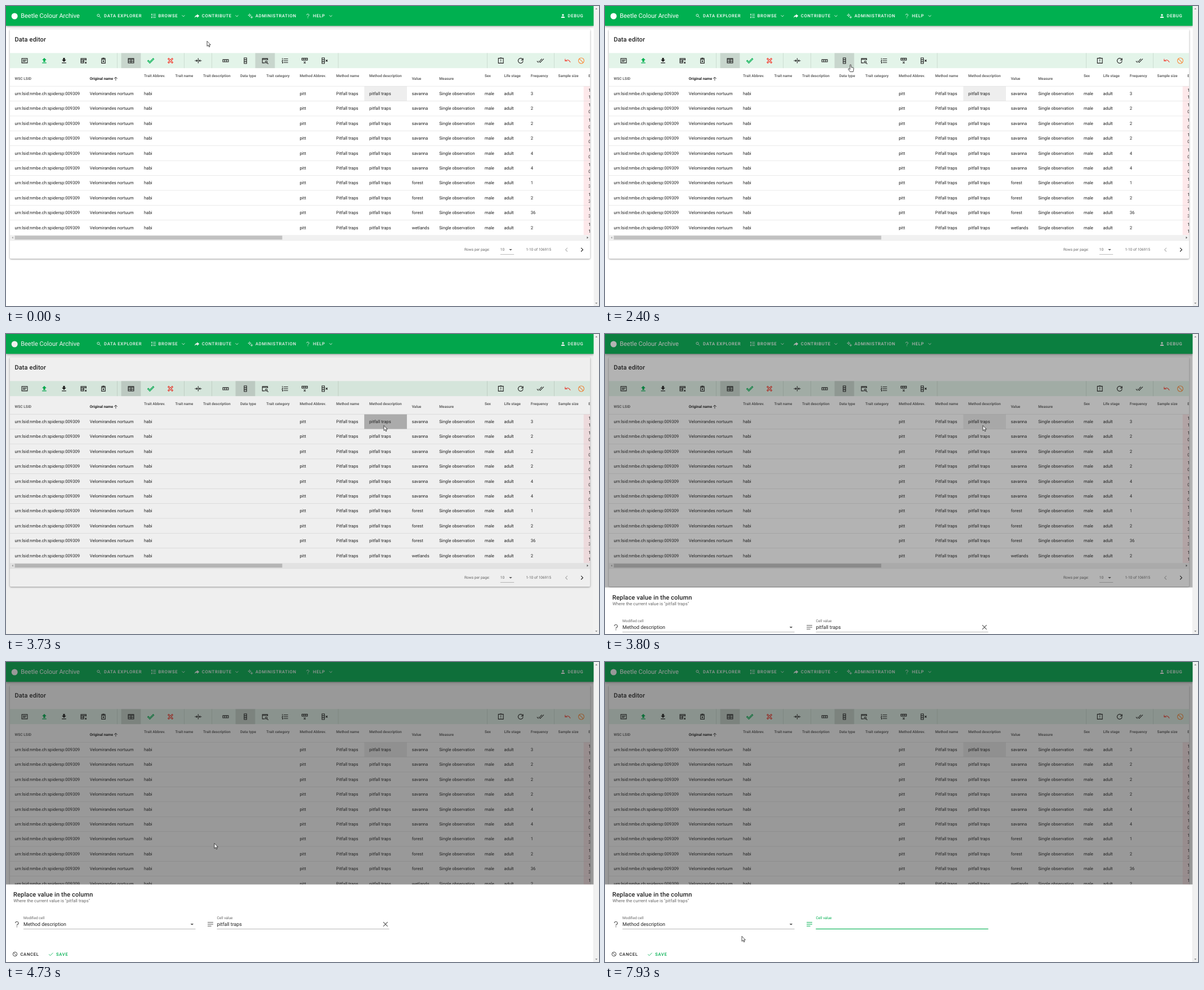
An HTML page for the animation above (8000 ms loop, 1053 by 532 pixels).

```html
<!DOCTYPE html>
<html lang="en">
<head>
<meta charset="utf-8">
<title>Data editor</title>
<style>
  html, body { margin: 0; width: 100%; height: 100%; overflow: hidden; background: #fff; }
  svg { display: block; }
  text { font-family: Roboto, "Liberation Sans", sans-serif; text-rendering: geometricPrecision; white-space: pre; }
</style>
</head>
<body>
<svg id="stage" width="1053" height="532" viewBox="0 0 1053 532"></svg>
<script>
const GREEN = '#00b050', INK = '#212121', GREY = '#666', RED = '#f44336';
const FRAME = 1000 / 15, COUNT = 120;
const ROW_TOP = 142.2, ROW_H = 26.4, EDGE = 1043.65;

// Icon outlines on a 24 unit grid; a leading "f" means filled.
const ICONS = {
  search: 'M14.5 9.5a5 5 0 1 1-10 0a5 5 0 1 1 10 0M13.5 13.5l6.5 6.5',
  list: 'M10 5h12M10 12h12M10 19h12M3 4h3v3H3zM3 12h4M3 17h3v3H3z',
  share: 'fM13 4l9 8-9 8v-5Q6 14 2 20 4 9 13 9z',
  help: 'M7 8.5a5 4.5 0 1 1 7 4q-2 1-2 4M12 19v2.5',
  user: 'fM16 8a4 4 0 1 1-8 0a4 4 0 1 1 8 0M4 20q0-6 8-6t8 6z',
  down: 'M6 9l6 6 6-6', prev: 'M15 6l-6 6 6 6', next: 'M9 6l6 6-6 6',
  card: 'M3 5h18v14H3zM6 10h12M6 14h9',
  upload: 'fM9 16v-6H5l7-7 7 7h-4v6zM5 18h14v2H5z',
  download: 'fM5 20h14v-2H5zM19 9h-4V3H9v6H5l7 7z',
  tableX: 'M20 11V5H3v14h10M3 9h17M3 14h11M11.5 9v10M16 16l5 5m0-5l-5 5',
  bin: 'M6 8h12v12H6zM5 5h14M9 3.5h6M10 12l4 4m0-4l-4 4',
  table: 'M3 5h18v14H3zM3 8h18M3 13.5h18M12 8v11',
  accept: 'M20 4.5l2.3 2.3L9 20l-7-7 2.3-2.3L9 15.4z',
  reject: 'M4 6.5L6.5 4 12 9.5 17.5 4 20 6.5 14.5 12 20 17.5 17.5 20 12 14.5 6.5 20 4 17.5 9.5 12z',
  collapse: 'M1 12h8M6 9l3 3-3 3M23 12h-8M18 9l-3 3 3 3M12 4v16',
  row: 'M3 8.5h18v7H3zM9 8.5v7M15 8.5v7',
  column: 'M8 3h8v18H8zM8 9h8M8 15h8',
  tableFind: 'M20 10V5H3v14h8M3 8h17M18.5 16a3 3 0 1 1-6 0a3 3 0 1 1 6 0M18 18.5l4 4',
  numbers: 'M8 6h14M8 12h14M8 18h14M4 4v4M3 10.5h2l-2 3h2M3 16.5h2v3H3',
  rowX: 'M3 4h18v6H3zM9 4v6M15 4v6M9 15l6 6m0-6l-6 6',
  columnX: 'M4 3h8v18H4zM4 9h8M4 15h8M16 9l6 6m0-6l-6 6',
  clip: 'M4 4h16v16H4zM9 3h6M12 8v5M12 15v2',
  reload: 'M19 8A8 8 0 1 0 20 13M20 4v6h-6',
  checkAll: 'M1 13l5 5M6.5 12.5l5 5L23 6M17 6l-6.5 6.5',
  undo: 'M4 6v7h7M5 12.5Q13 5 21 17',
  cancel: 'M21 12a9 9 0 1 1-18 0a9 9 0 1 1 18 0M5.5 5.5l13 13',
  check: 'M3 12.5l6 6L21 6.5',
  close: 'M5 5l14 14m0-14L5 19',
  notes: 'M3 6h18M3 12h18M3 18h12',
  caret: 'fM7 10l5 5 5-5z',
  arrowUp: 'M12 20V5M5 12l7-7 7 7',
  cogs: 'M12 9a3.5 3.5 0 1 1-7 0a3.5 3.5 0 1 1 7 0M8.5 2v3M8.5 13v3M1.5 9h3M12.5 9h3M20 17.5a2.5 2.5 0 1 1-5 0a2.5 2.5 0 1 1 5 0M17.5 12.5v2M17.5 20.5v2M12.5 17.5h2M20.5 17.5h2'
};

const rect = (x, y, w, h, fill, more = '') =>
  `<rect x="${x}" y="${y}" width="${w}" height="${h}" fill="${fill}" ${more}/>`;

// y is the middle of the text line
const text = (x, y, str, size = 7.7, fill = INK, weight = 400, gap = 0, more = '') =>
  `<text x="${x}" y="${y + size * .342}" font-size="${size}" fill="${fill}" font-weight="${weight}" letter-spacing="${gap}" ${more}>${str}</text>`;

const label = (x, y, str, fill) => text(x, y, str, 7.7, fill, 500, .69);

function icon(name, x, y, color = INK, size = 13.2, more = '') {
  const d = ICONS[name], k = size / 24;
  const paint = d[0] === 'f' ? 'fill="currentColor"' : 'fill="none" stroke="currentColor" stroke-width="2"';
  return `<g color="${color}" ${more}><path transform="translate(${x - size / 2} ${y - size / 2}) scale(${k})" d="${d.replace('f', '')}" ${paint}/></g>`;
}

// [x, middle, heading, value of every row]
const COLS = [
  [15.5, 129, 'WSC LSID', 'urn:lsid:nmbe.ch:spidersp:009309'],
  [148.8, 129, 'Original name', 'Velomirandes nortuum'],
  [245, 124, 'Trait Abbrev.', 'habi'],
  [300.5, 124, 'Trait name'],
  [350, 124, 'Trait description'],
  [416, 124, 'Data type'],
  [462.3, 124, 'Trait category'],
  [521.5, 124, 'Method Abbrev.', 'pitt'],
  [586.3, 124, 'Method name', 'Pitfall traps'],
  [645, 124, 'Method description', 'pitfall traps'],
  [720.7, 129, 'Value'],
  [769.3, 129, 'Measure', 'Single observation'],
  [850, 124, 'Sex', 'male'],
  [884.5, 124, 'Life stage', 'adult'],
  [931.8, 124, 'Frequency'],
  [980.6, 124, 'Sample size'],
  [1034.3, 124, 'E']
];
const HABITATS = ['savanna', 'savanna', 'savanna', 'savanna', 'savanna', 'savanna', 'forest', 'forest', 'forest', 'wetlands'];
const COUNTS = [3, 2, 2, 2, 4, 4, 1, 2, 36, 2];
const TAILS = '1000003331';

function drawBar() {
  let s = rect(0, 0, EDGE, 35.2, GREEN, 'style="filter:drop-shadow(0 1px 2px rgba(0,0,0,.4))"');
  s += '<circle cx="15.2" cy="18" r="5.5" fill="#fff"/>' + text(26.2, 17.6, 'Beetle Colour Archive', 11, '#fff');
  const items = [
    ['search', 165, 174, 'DATA EXPLORER'], ['list', 262, 270.5, 'BROWSE', 315], ['share', 339, 347.8, 'CONTRIBUTE', 410],
    ['cogs', 434, 443, 'ADMINISTRATION'], ['help', 536, 545, 'HELP', 576.7], ['user', 989, 997.5, 'DEBUG']
  ];
  for (const [name, ix, tx, str, chevron] of items) {
    s += icon(name, ix, 17.6, '#fff', 9.9) + label(tx, 17.6, str, '#fff');
    if (chevron) s += icon('down', chevron, 17.6, '#fff', 9.9);
  }
  return s;
}

function drawTools() {
  const on = (id, x) => rect(x - 17.4, 83.4, 34.8, 26.8, '#000', `id="${id}" opacity=".12"`);
  let s = rect(7, 83.4, 1030.2, 26.8, '#e3f4e9') + on('tabOn', 222) + on('colOn', 425) + on('findOn', 460);
  for (const x of [197.7, 316.5, 365.5, 590, 854.3, 973.5]) s += rect(x - .3, 83.4, .6, 26.8, '#bfcdc4');
  const left = ['card', 'upload', 'download', 'tableX', 'bin'];
  const mid = ['row', 'column', 'tableFind', 'numbers', 'rowX', 'columnX'];
  left.forEach((n, i) => s += icon(n, 33 + 35 * i, 97, i === 1 ? GREEN : INK));
  mid.forEach((n, i) => s += icon(n, 390 + 35.1 * i, 97));
  ['clip', 'reload', 'checkAll'].forEach((n, i) => s += icon(n, 878.7 + 35.1 * i, 97));
  return s + icon('table', 222, 97) + icon('accept', 257, 97, GREEN) + icon('reject', 292, 97, RED) +
    icon('collapse', 341.3, 97) + icon('undo', 997.3, 97, RED) + icon('cancel', 1021.5, 97, '#fb8c3c');
}

function drawTable() {
  let s = rect(1025.7, ROW_TOP, 11.5, ROW_H * 10, '#fde8ea');
  s += rect(7, ROW_TOP, 1018.7, ROW_H, '#eee', 'id="rowHover"');
  s += rect(636.2, ROW_TOP, 75.8, ROW_H, '#eee') + rect(0, ROW_TOP, 0, ROW_H, '#b6b6b6', 'id="cellHover"');
  for (const [x, y, head, value] of COLS) {
    s += text(x, y, head, 6.6, head === 'Original name' ? INK : GREY, 700);
    for (let i = 0; i < 10; i++) {
      const v = head === 'Value' ? HABITATS[i] : head === 'Frequency' ? COUNTS[i] : value;
      if (v) s += text(x, ROW_TOP + ROW_H * (i + .5), v);
    }
  }
  for (let i = 0; i < 10; i++) {
    const y = ROW_TOP + ROW_H * i;
    s += rect(7, y - .3, 1030.2, .6, '#dcdcdc') + text(1034.3, y + 7.1, '1') + text(1034.3, y + 19.2, TAILS[i]);
  }
  s += icon('arrowUp', 194.9, 129, INK, 9.9);
  s += rect(7, 406.2, 1030.2, 9.4, '#f1f1f1') + rect(15.5, 407.3, 475, 7, '#c1c1c1');
  s += '<path d="M12.8 408.8v4l-2.4-2z" fill="#a3a3a3"/><path d="M1031.6 408.8v4l2.4-2z" fill="#505050"/>';
  return s + rect(7, 415.6, 1030.2, .6, '#e0e0e0');
}

function drawFooter() {
  return text(814, 432.2, 'Rows per page:', 6.6, GREY) + text(877.8, 432.2, '10', 6.6, GREY) +
    icon('caret', 896, 432.2, GREY) + rect(877.8, 440, 24.4, .6, '#949494') +
    text(923.4, 432.2, '1-10 of 106915', 6.6, GREY) +
    icon('prev', 995.3, 432.2, '#b5b5b5') + icon('next', 1022.8, 432.2);
}

function drawTip() {
  const lines = ['Column mode. Select a cell to replace', 'its value in all rows of the column that', 'have the same value'];
  return `<g id="tip">${rect(343, 63.4, 165, 42, '#616161', 'rx="2.2"')}` +
    lines.map((l, i) => text(351.8, 72.2 + 12.1 * i, l, 7.7, '#fff')).join('') + '</g>';
}

function drawSheet() {
  return '<g id="sheet">' + rect(0, 394.5, EDGE, 140, '#fff') +
    text(13, 412.2, 'Replace value in the column', 11, INK, 500, .14) +
    text(13.2, 423.4, 'Where the current value is "pitfall traps"', 7.7, GREY, 400, .055) +
    icon('help', 19.4, 465, '#555') + text(31, 453.7, 'Modified cell', 6.6, GREY) +
    text(31, 465, 'Method description', 8.8) + icon('caret', 330.3, 465, '#555') +
    rect(31, 473.3, 305.5, .6, '#888') +
    icon('notes', 363, 465, '#555', 13.2, 'id="note"') + text(374.5, 453.7, 'Cell value', 6.6, GREY, 400, 0, 'id="name"') +
    `<g id="value">${text(374.5, 465, 'pitfall traps', 8.8)}${icon('close', 673.8, 465, '#555')}</g>` +
    rect(374.5, 473.3, 306, .6, '#888', 'id="line"') + rect(374.5, 472.9, 0, 1.1, GREEN, 'id="focus"') +
    icon('cancel', 16, 518, INK, 9.9) + label(25.4, 518, 'CANCEL', INK) +
    icon('check', 79.8, 518, GREEN, 9.9) + label(89, 518, 'SAVE', GREEN) + '</g>';
}

function drawCursors() {
  const shape = (id, d, w = .7) => `<path id="${id}" d="${d}" fill="#fff" stroke="#000" stroke-width="${w}" stroke-linejoin="round"/>`;
  return '<g id="cursor">' +
    shape('arrow', 'M0 .3V9.3L2.1 7.4 3.5 10.6 5 10 3.6 6.9H6.4Z') +
    shape('hand', 'M-1 1a1 1 0 0 1 2 0V4.6l3.6 .8q1.3 .4 1.1 2l-.9 5.2h-5.6l-3.2-4.4q-.2-1.5 1.4-1l1.6 1.3z') +
    shape('cross', 'M-1.2-4h2.4v2.8H4v2.4H1.2V4h-2.4V1.2H-4v-2.4h2.8z', .9) +
    '<path id="beam" d="M-2-4.3q2 0 2 1V3.3q0 1-2 1M2-4.3q-2 0-2 1V3.3q0 1 2 1" fill="none" stroke="#000" stroke-width=".8"/></g>';
}

document.getElementById('stage').innerHTML =
  '<clipPath id="inner"><path d="M7 40H1037.2V448H7z"/></clipPath>' +
  rect(0, 0, 1053, 532, '#fff') +
  rect(6.8, 41.2, 1030.5, 406.8, '#fff', 'rx="2" style="filter:drop-shadow(0 1px 1.5px rgba(0,0,0,.4))"') +
  drawBar() + text(15.4, 59.4, 'Data editor', 11, INK, 500, .14) +
  '<g clip-path="url(#inner)">' + drawTools() + drawTable() + '</g>' + drawFooter() + drawTip() +
  rect(0, 0, EDGE, 532, INK, 'id="shade"') + drawSheet() +
  rect(EDGE, 0, 9.4, 532, '#f1f1f1') +
  '<path d="M1046.3 6h4l-2-2.4zM1046.3 526h4l-2 2.4z" fill="#8f8f8f"/>' + drawCursors();

const el = {};
document.querySelectorAll('[id]').forEach(e => el[e.id] = e);
const show = (e, on) => e.setAttribute('opacity', on === true ? 1 : +on);

// [step, x, y] of the pointer
const PATH = [
  [0, 357, 62], [2, 366, 70], [4, 405, 90], [6, 430, 100], [8, 435, 102], [35, 435, 102],
  [36, 436, 104], [38, 455, 112], [42, 560, 138], [46, 650, 157], [48, 668, 161], [49, 669, 162],
  [51, 669, 162], [52, 670, 162], [55, 670, 162], [56, 671, 162], [63, 671, 162], [64, 668, 166], [66, 640, 195],
  [70, 430, 300], [74, 190, 385], [76, 108, 410], [78, 78, 428], [80, 95, 438], [83, 250, 446],
  [86, 470, 456], [88, 585, 464], [89, 610, 465], [92, 655, 466], [94, 690, 471], [96, 705, 475],
  [98, 692, 470], [101, 674, 465], [106, 674, 465], [107, 668, 467], [110, 570, 476], [114, 380, 484],
  [117, 270, 486], [119, 243, 486]
];
const TIP = [[5, 0], [6, .3], [7, .7], [8, .9], [27, .9], [28, .7], [29, .4], [30, .15], [31, 0]];
const SHADE = [[55, 0], [56, .07], [57, .34], [58, .45], [59, .46]];
const SLIDE = [[56, 137.5], [57, 55], [58, 12.5], [59, 2.5], [60, 0]];

function at(keys, n, k = 1) {
  let i = keys.findIndex(key => key[0] >= n);
  if (i < 0) return keys[keys.length - 1][k];
  if (i === 0) return keys[0][k];
  const a = keys[i - 1], b = keys[i];
  return a[k] + (b[k] - a[k]) * (n - a[0]) / (b[0] - a[0]);
}

function render(n) {
  const x = at(PATH, n), y = at(PATH, n, 2);
  const open = n >= 56, cleared = n >= 107;
  const inField = open && x > 374 && x < 681 && y > 448 && y < 475;
  const inTable = !open && y > ROW_TOP;

  let kind = 'arrow';
  if (inField) kind = x > 666 ? 'hand' : 'beam';
  else if (n > 74 && n < 78) kind = 'beam';
  else if (inTable) kind = 'cross';
  else if (!open && y > 83) kind = 'hand';
  for (const id of ['arrow', 'hand', 'cross', 'beam']) show(el[id], id === kind);
  el.cursor.setAttribute('transform', `translate(${x} ${y})`);

  show(el.findOn, n < 9 ? .12 : 0);
  show(el.colOn, n < 9 ? 0 : .12);
  show(el.tip, at(TIP, n));

  show(el.rowHover, inTable);
  show(el.cellHover, inTable || n === 56);
  const c = COLS.findLastIndex(col => col[0] - 8.8 <= x);
  const left = COLS[c][0] - 8.8;
  el.cellHover.setAttribute('x', left);
  el.cellHover.setAttribute('width', COLS[c + 1][0] - 8.8 - left);

  show(el.shade, at(SHADE, n));
  show(el.sheet, open);
  el.sheet.setAttribute('transform', `translate(0 ${at(SLIDE, n)})`);

  show(el.value, !cleared);
  el.note.setAttribute('color', cleared ? GREEN : '#555');
  el.name.setAttribute('fill', cleared ? GREEN : GREY);
  el.line.setAttribute('fill', inField ? INK : '#888');
  const grow = cleared ? 1 - (1 - Math.min(1, (n - 106) / 5)) ** 2 : 0;
  el.focus.setAttribute('x', 527.5 - 153 * grow);
  el.focus.setAttribute('width', 306 * grow);
}

const start = performance.now();
function tick() {
  const t = (performance.now() - start) % (FRAME * COUNT);
  render(Math.min(COUNT - 1, Math.floor(t / FRAME + .1)));
  requestAnimationFrame(tick);
}
tick();
</script>
</body>
</html>
```
